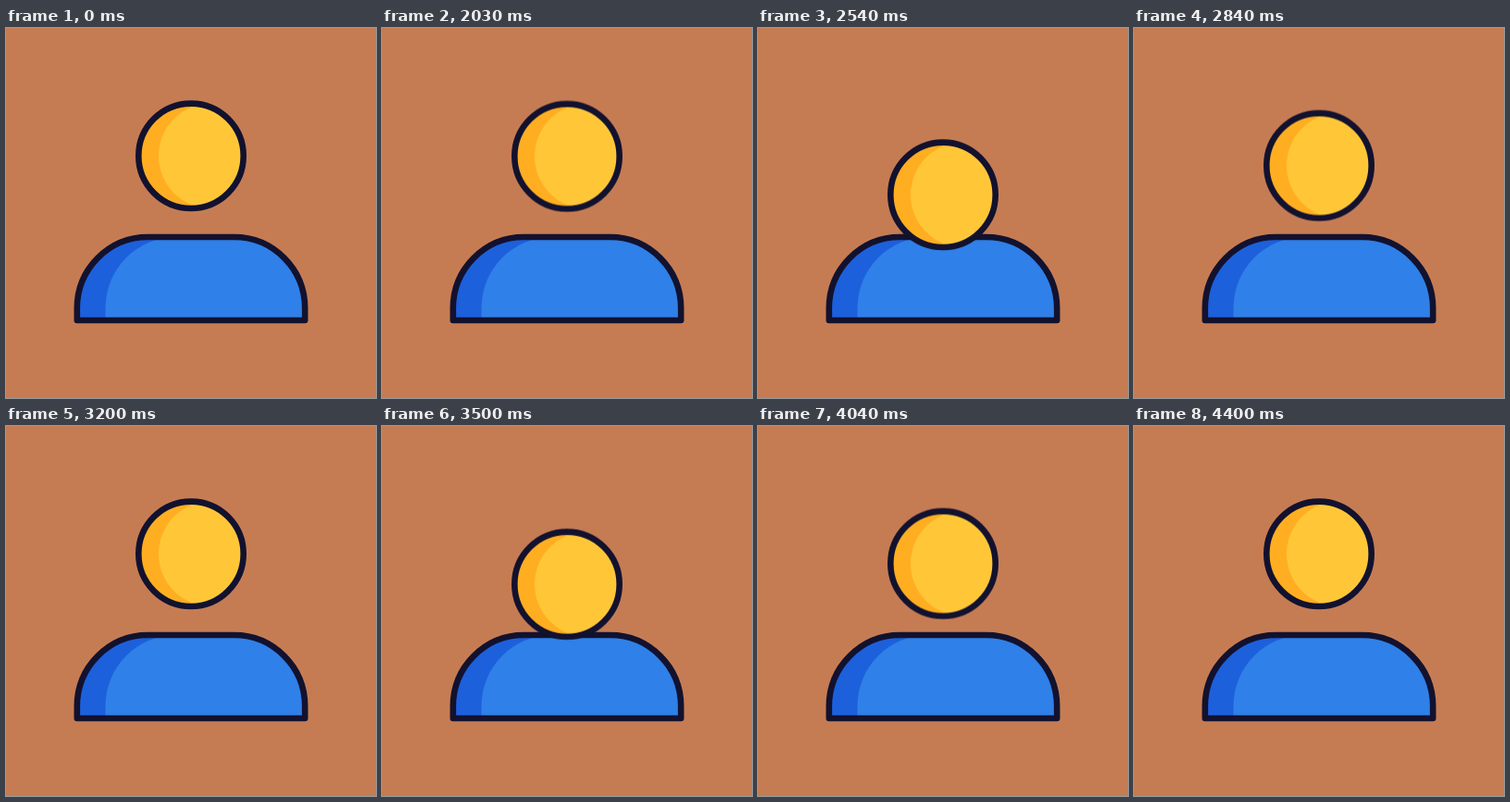
These frames come from a looping animation (400 by 400 pixels, 4.55 s). An HTML page:

```html
<!DOCTYPE html>
<html lang="en">
<head>
<meta charset="utf-8">
<title>User icon</title>
<style>
  html, body { margin: 0; width: 100%; height: 100%; overflow: hidden; background: #c67c53; }
  svg { display: block; width: 100vw; height: 100vh; }
  .line { fill: none; stroke: #12122f; stroke-width: 6.6; stroke-linejoin: round; }
  .head { animation: nod 4550ms infinite; }
  /* 2 s rest, then two nods of 600 ms down and 600 ms up */
  @keyframes nod {
    0% { transform: none; }
    43.956%, 70.33% { transform: none; animation-timing-function: cubic-bezier(.3, 0, .25, 1); }
    57.143%, 83.516% { transform: translateY(42.3px); animation-timing-function: cubic-bezier(.2, 0, .115, 1); }
    96.703%, 100% { transform: none; }
  }
</style>
</head>
<body>
<svg viewBox="0 0 400 400">
  <defs>
    <path id="torso" d="M76.8 316V303C76.8 260.5 111 226 153.5 226H246.5C289 226 323.2 260.5 323.2 303V316Z"/>
    <circle id="face" cx="200" cy="138.3" r="56.7"/>
    <clipPath id="inTorso"><use href="#torso"/></clipPath>
    <clipPath id="inFace"><use href="#face"/></clipPath>
  </defs>
  <g>
    <use href="#torso" fill="#1d60dc"/>
    <path clip-path="url(#inTorso)" fill="#2f80e8" d="M107.5 316V303C107.5 260.5 141.5 226 184 226H330V316Z"/>
    <use href="#torso" class="line"/>
  </g>
  <g class="head">
    <use href="#face" fill="#ffae21"/>
    <circle clip-path="url(#inFace)" fill="#ffc738" cx="222" cy="138.3" r="57"/>
    <use href="#face" class="line"/>
  </g>
</svg>
</body>
</html>
```
